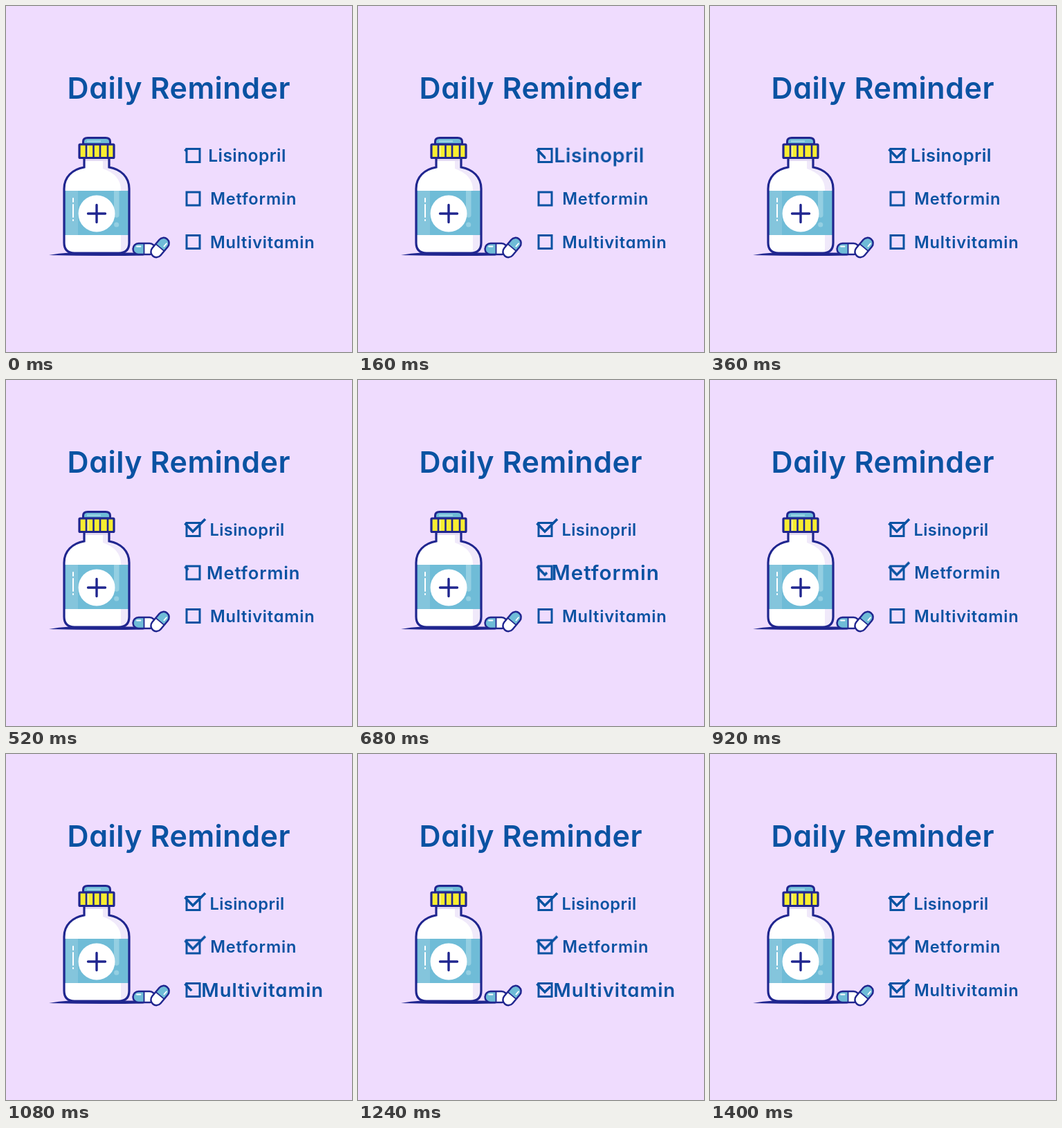
Animation, 500 px wide and 500 px high, one loop 1.92 s. Source, as an HTML page:

```html
<!DOCTYPE html>
<html lang="en">
<head>
<meta charset="utf-8">
<title>Daily Reminder</title>
<style>
  html, body { margin: 0; width: 100%; height: 100%; overflow: hidden; background: #efdcfe; }
  svg { display: block; width: 100vw; height: 100vh; }
  text {
    font-family: Inter, Lato, sans-serif;
    font-feature-settings: "cv11";
    font-weight: 600;
    fill: #0a52a2;
    text-anchor: middle;
  }
  .title { font-size: 43px; letter-spacing: .5px; }
  .item {
    font-size: 23.6px;
    letter-spacing: .8px;
    transform-origin: 0 0;
    animation: pulse 1920ms steps(6) var(--delay) infinite;
  }
  .box, .tick { fill: none; stroke: #0a52a2; }
  .box { stroke-width: 3; }
  .tick { stroke-width: 3.6; stroke-dasharray: 1 2; }

  .row1 { --delay: -41ms; }
  .row2 { --delay: -1481ms; }
  .row3 { --delay: -1001ms; }
  .row1 .item { letter-spacing: .4px; }
  .row1 .tick { animation: tick1 1920ms steps(11) -1ms infinite; }
  .row2 .tick { animation: tick2 1920ms steps(12) -1ms infinite; }
  .row3 .tick { animation: tick3 1920ms steps(12) -1ms infinite; }

  @keyframes pulse {
    0% { transform: scale(1); }
    12.5% { transform: scale(1.25); }
    25%, 100% { transform: scale(1); }
  }
  /* each tick takes 480 ms; the first is already under way at the loop start */
  @keyframes tick1 {
    0% { stroke-dashoffset: .9167; }
    22.9167%, 100% { stroke-dashoffset: 0; }
  }
  @keyframes tick2 {
    0%, 22.9167% { stroke-dashoffset: 1; }
    47.9167%, 100% { stroke-dashoffset: 0; }
  }
  @keyframes tick3 {
    0%, 47.9167% { stroke-dashoffset: 1; }
    72.9167%, 100% { stroke-dashoffset: 0; }
  }
</style>
</head>
<body>
<svg viewBox="0 0 500 500">
  <defs>
    <path id="body" d="M113 219V233C96 236 84 247 84 264V342Q84 357 99 357H163Q178 357 178 342V264C178 247 166 236 149 233V219Z"/>
    <clipPath id="inside"><use href="#body"/></clipPath>
    <g id="pill">
      <rect x="-16" y="-8" width="32" height="16" rx="8" fill="#fff"/>
      <path d="M0 -8H-8A8 8 0 0 0 -8 8H0Z" fill="#6fbcd7"/>
      <path d="M-10.5 -3.5H-5" stroke="#fff" stroke-width="1.8" stroke-linecap="round"/>
      <path d="M0 -8V8" stroke="#20268f" stroke-width="1.8"/>
      <rect x="-16" y="-8" width="32" height="16" rx="8" fill="none" stroke="#20268f" stroke-width="2.5"/>
    </g>
    <g id="check">
      <rect class="box" x="261" y="-9.5" width="19" height="19"/>
      <path class="tick" pathLength="1" d="M258.5 -9L270 3L288 -15"/>
    </g>
  </defs>
  <rect width="500" height="500" fill="#efdcfe"/>
  <text class="title" x="249.8" y="134">Daily Reminder</text>

  <g>
    <path d="M62 360Q76 357 92 356.500H184L200 360.500Q130 361.800 62 360Z" fill="#20268f"/>
    <path d="M111.500 200V196Q111.500 190.500 118 190.500H144Q150.500 190.500 150.500 196V200Z" fill="#6fbcd7" stroke="#20268f" stroke-width="3"/>
    <path d="M117 195.500H137" stroke="#a5d8e8" stroke-width="2"/>
    <g clip-path="url(#inside)">
      <rect x="80" y="215" width="102" height="146" fill="#fff"/>
      <path d="M140 219V235Q166 244 166 266V357H180V219Z" fill="#f0e9fa"/>
      <rect x="113" y="219" width="36" height="5" fill="#e4daf3"/>
      <rect x="80" y="267" width="102" height="64" fill="#6fbcd7"/>
      <rect x="87" y="267" width="17" height="64" fill="#84c5dc"/>
      <path d="M156 267H163.500V302A3.750 3.750 0 0 1 156 302Z" fill="#94cfe2"/>
      <circle cx="159.700" cy="316" r="3.600" fill="#94cfe2"/>
    </g>
    <path d="M97 278V283M97 287V305M97 309V310" stroke="#fff" stroke-width="2" stroke-linecap="round"/>
    <circle cx="131" cy="300" r="26.500" fill="#fff"/>
    <path d="M118.500 300H143.500M131 287.500V312.500" stroke="#20268f" stroke-width="3.400" stroke-linecap="round"/>
    <use href="#body" fill="none" stroke="#20268f" stroke-width="3.200"/>
    <rect x="106" y="200" width="50" height="19.500" fill="#f8ed30"/>
    <path d="M118.500 201.500V218" stroke="#fcf69a" stroke-width="2"/>
    <path d="M116 201V219M126.500 201V219M136 201V219M147 201V219" stroke="#20268f" stroke-width="2.600"/>
    <rect x="106" y="200" width="50" height="19.500" rx="1" fill="none" stroke="#20268f" stroke-width="3.200"/>
  </g>
  <use href="#pill" transform="translate(199.500 351)"/>
  <use href="#pill" transform="translate(222.500 349) rotate(130)"/>

  <g class="row1" transform="translate(0 216)">
    <rect class="box" x="261" y="-9.500" width="19" height="19"/>
    <path class="tick" pathLength="1" d="M258.500 -9L270 3L288 -15"/>
    <g transform="translate(348.500 0)"><text class="item" y="8.500">Lisinopril</text></g>
  </g>
  <g class="row2" transform="translate(0 278.500)">
    <rect class="box" x="261" y="-9.500" width="19" height="19"/>
    <path class="tick" pathLength="1" d="M258.500 -9L270 3L288 -15"/>
    <g transform="translate(357.700 0)"><text class="item" y="8.500">Metformin</text></g>
  </g>
  <g class="row3" transform="translate(0 341)">
    <rect class="box" x="261" y="-9.500" width="19" height="19"/>
    <path class="tick" pathLength="1" d="M258.500 -9L270 3L288 -15"/>
    <g transform="translate(370.700 0)"><text class="item" y="8.500">Multivitamin</text></g>
  </g>
</svg>
</body>
</html>
```
